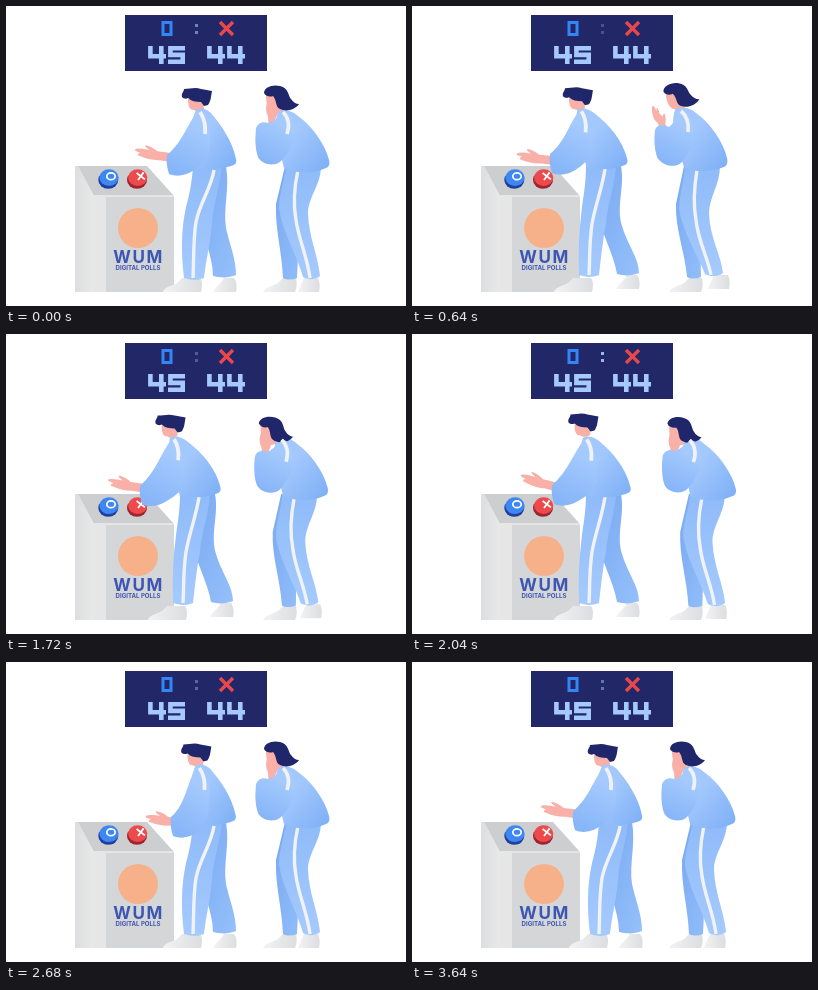
Recreate the animation shown at these times as an HTML page. Size 400 by 300 pixels, loop 3.68 s.

```html
<!DOCTYPE html>
<html lang="en">
<head>
<meta charset="utf-8">
<title>Voting booth</title>
<style>
  html, body { margin: 0; width: 100%; height: 100%; overflow: hidden; background: #fff; }
  svg { display: block; width: 400px; height: 300px; }
  text { font-family: Inter, Roboto, sans-serif; font-weight: 700; text-anchor: middle; fill: #3c56b4; }
</style>
</head>
<body>
<svg viewBox="0 0 400 300">
  <defs>
    <linearGradient id="coat" x1="0" y1="0" x2="1" y2="1">
      <stop offset=".35" stop-color="#a3c8fd"/><stop offset="1" stop-color="#7caef5"/>
    </linearGradient>
    <linearGradient id="sleeve" x1="0.7" y1="0" x2="0.35" y2="1">
      <stop offset=".2" stop-color="#a5cafe"/><stop offset="1" stop-color="#86b5f8"/>
    </linearGradient>
    <linearGradient id="near" x1="0" y1="0" x2="0" y2="1">
      <stop offset="0" stop-color="#8fbbf9"/><stop offset="1" stop-color="#a5cafe"/>
    </linearGradient>
    <linearGradient id="far" x1="0" y1="0" x2="1" y2="1">
      <stop offset="0" stop-color="#79a9f0"/><stop offset="1" stop-color="#95c0fb"/>
    </linearGradient>
    <linearGradient id="shoe" x1="0" y1="0" x2="1" y2="0">
      <stop offset="0" stop-color="#f3f3f4"/><stop offset="1" stop-color="#dcdde0"/>
    </linearGradient>
    <linearGradient id="side" x1="0" y1="0" x2="1" y2="0">
      <stop offset="0" stop-color="#dddedf"/><stop offset="1" stop-color="#efefef"/>
    </linearGradient>
  </defs>

  <!-- scoreboard -->
  <rect x="119" y="9" width="142" height="56" fill="#222768"/>
  <g fill="none" stroke-width="3">
    <path d="M157 16.5H165V28.5H157Z" stroke="#3485f6"/>
    <path d="M214 16L227 29M227 16L214 29" stroke="#e8474b" stroke-width="3.4"/>
  </g>
  <g id="colon"><rect x="189" y="18" width="3" height="3"/><rect x="189" y="25" width="3" height="3"/></g>
  <g fill="none" stroke="#a5c8fd" stroke-width="4.6">
    <path id="four" d="M144.4 40V50.3H160M155.3 40V58"/>
    <path d="M179 42.3H164.4V48.9H176.7V55.7H162"/>
    <use href="#four" x="59"/>
    <use href="#four" x="79"/>
  </g>

  <!-- booth -->
  <path d="M69 160H100V286H69Z" fill="url(#side)"/>
  <path d="M72 160H141L168 190H88Z" fill="#cdced0"/>
  <path d="M69 160H72L88 190H100V286H69Z" fill="url(#side)"/>
  <path d="M88 189H168V191H100V286H88Z" fill="#e6e6e7"/>
  <rect x="100" y="191" width="68" height="95" fill="#d5d6d8"/>
  <g id="blueKey">
    <ellipse cx="102.3" cy="174" rx="10" ry="8.8" fill="#20409c"/>
    <ellipse cx="103" cy="171.6" rx="9.6" ry="8.4" fill="#3d87f5"/>
    <ellipse cx="105" cy="170.3" rx="4.2" ry="3.4" fill="none" stroke="#fff" stroke-width="1.7"/>
  </g>
  <ellipse cx="131" cy="174" rx="10" ry="8.8" fill="#9e2431"/>
  <ellipse cx="131.7" cy="171.6" rx="9.6" ry="8.4" fill="#ec4a4c"/>
  <path d="M130.6 167L139 173.4M137.6 166.4L132 174" stroke="#fff" stroke-width="1.8"/>
  <circle cx="132" cy="222" r="20" fill="#f6b18b"/>
  <text x="132.6" y="256.5" font-size="17" letter-spacing="1.6">WUM</text>
  <text x="132" y="264" font-size="6.1">DIGITAL POLLS</text>

  <g id="woman"></g>
  <g id="man"></g>
</svg>
<script>
const LOOP = 3680, STEP = 40;
const TIMES = [0, 320, 640, 1360, 2040, 2680];
const SKIN = "#f8b0a8", HAIR = "#20266a";
const $ = id => document.getElementById(id);

// Values at TIMES, joined by a cyclic curve that never overshoots.
function track(...v) {
  const n = v.length;
  const span = i => (i === n - 1 ? LOOP : TIMES[i + 1]) - TIMES[i];
  const rate = i => (v[(i + 1) % n] - v[i]) / span(i);
  const slope = i => {
    const a = rate((i + n - 1) % n), b = rate(i % n);
    return a * b <= 0 ? 0 : 2 * a * b / (a + b);
  };
  return t => {
    let i = n - 1;
    while (TIMES[i] > t) i--;
    const h = span(i), u = (t - TIMES[i]) / h, k = 1 - u;
    return v[i] * (1 + 2 * u) * k * k + v[(i + 1) % n] * u * u * (3 - 2 * u)
      + h * u * k * (slope(i) * k - slope((i + 1) % n) * u);
  };
}

// Blends two paths with the same commands.
function morph(a, b) {
  const end = b.match(/-?[\d.]+/g).map(Number);
  return w => {
    let i = 0;
    return a.replace(/-?[\d.]+/g, s => (+s + (end[i++] - s) * w).toFixed(2));
  };
}

function part(parent, fill, d = "") {
  const p = document.createElementNS("http://www.w3.org/2000/svg", "path");
  p.setAttribute("fill", fill);
  p.setAttribute("d", d);
  parent.appendChild(p);
  return p;
}
function stripe(parent, width) {
  const p = part(parent, "none");
  p.setAttribute("stroke", "#f1f2f3");
  p.setAttribute("stroke-width", width);
  return p;
}
const shape = (p, d) => p.setAttribute("d", d);
const place = (p, x, y, r = 0) => p.setAttribute("transform", `translate(${x} ${y}) rotate(${r})`);

function makeMan(g) {
  const shoeShape = "M0 14C1 9 9 8 14 5L19 0H37C40 4 39 10 38 14Z";
  const farShoe = part(g, "url(#shoe)", "M0 14C2 9 7 7 11 0H21C24 4 24 9 23 14Z");
  const nearShoe = part(g, "url(#shoe)", shoeShape);
  const farLeg = part(g, "url(#far)"), nearLeg = part(g, "url(#near)"), seam = stripe(g, 3.4);
  const hand = part(g, SKIN,
    "M10 -4L-11 -4.5C-14 -7 -19 -9 -23 -9.5C-25 -9 -23 -7.5 -19 -5C-24 -5.5 -30 -6 -33 -4.5C-35 -3 -32 -2 -28 -1.5C-31 0 -31 2 -28 2C-22 4 -14 5 -8 4L10 5Z");
  const face = part(g, SKIN, "M-9 2L6 3L7 12C4 15 -1 15 -3 13C-7 13 -9 10 -9 2Z");
  const coat = part(g, "url(#coat)"), sleeve = part(g, "url(#sleeve)"), mark = stripe(g, 3.8);
  const hair = part(g, HAIR,
    "M-15 0C-16 -4 -13 -5 -13 -8C-7 -8 -2 -10 4 -8C8 -7 11 -7 15 -6C14 -1 14 4 11 8L7 9L4 5C-1 5 -6 4 -9 1C-11 2 -13 2 -15 0Z");

  const farPath = morph("M194 160H220C224 182 217 202 220 222C224 240 230 253 230 269C223 272 215 272 207 270C207 249 195 226 192 204Z",
                        "M186 160H209C213 181 204 200 210 220C215 238 227 252 227 267C220 270 212 270 205 268C202 249 189 226 185 204Z");
  const nearPath = morph("M187 160H216C214 180 207 199 206 218C204 240 200 253 198 272C191 275 184 274 178 272C175 247 175 224 180 201C184 187 186 175 187 160Z",
                         "M174 160H204C203 180 195 199 194 218C190 239 189 253 187 269C180 272 173 271 167 269C166 247 167 224 170 201C172 187 174 175 174 160Z");
  const seamPath = morph("M208 164C205 183 194 196 190 216C187 235 188 253 187 272",
                         "M193 163C190 183 183 200 180 218C177 238 178 253 177 269");
  const coatPath = morph("M190 104C194 101 201 103 205 107C215 119 226 134 230 153C231 157 229 159 225 160C212 164 200 164 186 162C185 141 182 122 190 104Z",
                         "M160 104C164 101 172 103 177 107C193 118 207 134 212 153C213 157 211 159 207 160C196 164 184 164 172 162C168 141 156 122 160 104Z");
  const markPath = morph("M194 106C198 112 200 119 199 128", "M164 105C168 111 169 118 168 126");

  const lean = track(0, -.2, .82, 1, .64, .02), stepIn = track(0, 0, 1, 1, 1, 0);
  const lift = track(0, -2.5, -.8, 0, -2.6, -.6);
  const cuffX = track(161, 165, 138, 131, 140, 165), cuffY = track(158, 156, 157, 161, 160, 164);
  const wristX = track(162, 167, 138, 132, 141, 173), wristY = track(151, 146, 154, 156, 152, 160);
  const tilt = track(6, 20, 4, 1, 12, 3);

  return t => {
    const w = lean(t), s = stepIn(t), up = lift(t);
    place(farShoe, 207 - 3 * s, 272 - 3 * s);
    place(nearShoe, 157 - 15 * s, 272);
    shape(farLeg, farPath(s));
    shape(nearLeg, nearPath(s));
    shape(seam, seamPath(s));
    shape(coat, coatPath(w));
    shape(mark, markPath(w));
    place(face, 191 - 30.5 * w, 91 + up);
    place(hair, 191 - 30.5 * w, 91 + up);
    place(hand, wristX(t), wristY(t), tilt(t));
    const x = 192 - 30 * w, cx = cuffX(t), cy = cuffY(t);
    shape(sleeve, `M${x} 105C${x - 10} 116 ${cx + 16} ${cy - 22} ${cx} ${cy - 9}`
      + `C${cx - 1} ${cy - 3} ${cx} ${cy + 4} ${cx + 2} ${cy + 10}`
      + `C${cx + 15} ${cy + 15} ${cx + 27} ${cy + 8} ${x + 9} ${cy - 4}C${x + 14} 139 ${x + 13} 120 ${x + 6} 109Z`);
  };
}

function makeWoman(g) {
  const farShoe = part(g, "url(#shoe)", "M0 14C2 9 10 8 15 5L20 0H33C34 5 34 10 32 14Z");
  const nearShoe = part(g, "url(#shoe)", "M0 14C1 9 4 6 6 0H20C22 4 22 9 21 14Z");
  const farLeg = part(g, "url(#far)"), nearLeg = part(g, "url(#near)"), seam = stripe(g, 3.4);
  const face = part(g, SKIN, "M-15 -4L0 -5L3 13L-5 15C-7 13 -8 12 -9 12C-13 11 -15 4 -15 -4Z");
  const coat = part(g, "url(#coat)");
  const hair = part(g, HAIR,
    "M-17 -6C-17 -12 -8 -15 -1 -13C8 -11 7 -3 10 0C12 3 15 5 18 5C14 11 5 13 -1 10C-6 8 -4 1 -8 -3C-10 -2 -15 -2 -17 -6Z");
  const hand = part(g, SKIN,
    "M-3 8L-4 -8C-7 -13 -6 -19 -4 -24C-3 -27 -1 -25 -1 -19C0 -24 2 -23 1 -16L3 -12C5 -16 7 -15 5 -9L3 -4L4 8Z");
  const sleeve = part(g, "url(#sleeve)"), mark = stripe(g, 3.6);

  const farPath = morph("M279 160H304C302 183 294 204 293 229L291 272C286 274 281 274 277 272C276 246 269 223 270 198Z",
                        "M272 160H297C295 183 288 204 288 229L289 271C284 273 279 273 275 271C273 246 263 223 264 198Z");
  const nearPath = morph("M280 160H315C315 179 302 191 302 208C303 232 312 249 314 270C309 274 302 274 297 271C291 249 276 225 273 202C273 187 279 175 280 160Z",
                         "M273 160H308C308 179 297 191 297 208C298 232 309 249 311 267C306 271 298 271 293 268C286 249 270 225 267 202C268 187 272 175 273 160Z");
  const seamPath = morph("M292 164C288 182 287 198 290 214C293 235 301 249 304 272", "M285 164C282 182 281 198 284 214C286 235 295 249 299 269");
  const coatPath = morph("M272 106C278 102 287 105 292 110C306 120 319 138 323 154C324 158 323 161 320 162C307 168 291 168 278 162C274 142 266 122 272 106Z",
                         "M263 104C269 100 279 102 284 107C298 117 311 135 315 152C316 156 315 160 312 161C299 166 284 167 272 161C267 142 257 121 263 104Z");
  const sleevePath = morph("M277 107C270 112 268 116 262 117C257 115 251 117 250 123C249 132 249 142 252 151C256 159 269 161 275 155C283 147 290 133 288 117C286 109 281 105 277 107Z",
                           "M268 106C264 112 262 117 257 121C251 118 245 118 243 124C242 133 242 142 245 151C250 160 263 163 270 156C278 147 283 133 281 117C279 108 272 103 268 106Z");
  const markPath = morph("M277 106C283 112 284 119 281 128", "M269 105C275 110 277 117 276 126");

  const sway = track(0, .3, 1, .6, -.08, 0), shift = track(0, .35, 1, .8, .3, 0);
  const headX = track(0, -4, -6, -7.5, -3, 0), headY = track(0, 4.5, -3, 2.5, 4, 0);
  const nod = track(0, -2, -6, 2, 4, 0);
  const wristX = track(266, 258, 252, 257, 262, 266), wristY = track(118, 126, 123, 121, 122, 118);
  const bend = track(0, -12, -20, -6, 2, 0);

  return t => {
    const w = sway(t), s = shift(t), x = 275 + headX(t), y = 93 + headY(t), r = nod(t);
    place(farShoe, 257, 272);
    place(nearShoe, 292 + 4 * s, 272 - 3 * s);
    shape(farLeg, farPath(s));
    shape(nearLeg, nearPath(s));
    shape(seam, seamPath(s));
    shape(coat, coatPath(w));
    shape(sleeve, sleevePath(w));
    shape(mark, markPath(w));
    place(face, x, y, r);
    place(hair, x, y, r);
    place(hand, wristX(t), wristY(t), bend(t));
  };
}

const man = makeMan($("man")), woman = makeWoman($("woman"));

function draw(now) {
  const t = Math.floor((now % LOOP) / STEP) * STEP;
  const glow = .5 + .5 * Math.sin(t / 920 * 2 * Math.PI);
  $("colon").setAttribute("fill", "#a5c8fd");
  $("colon").setAttribute("opacity", (.25 + .65 * glow).toFixed(3));
  man(t);
  woman(t);
}

const start = performance.now();
function tick() {
  draw(performance.now() - start);
  requestAnimationFrame(tick);
}
tick();
</script>
</body>
</html>
```
